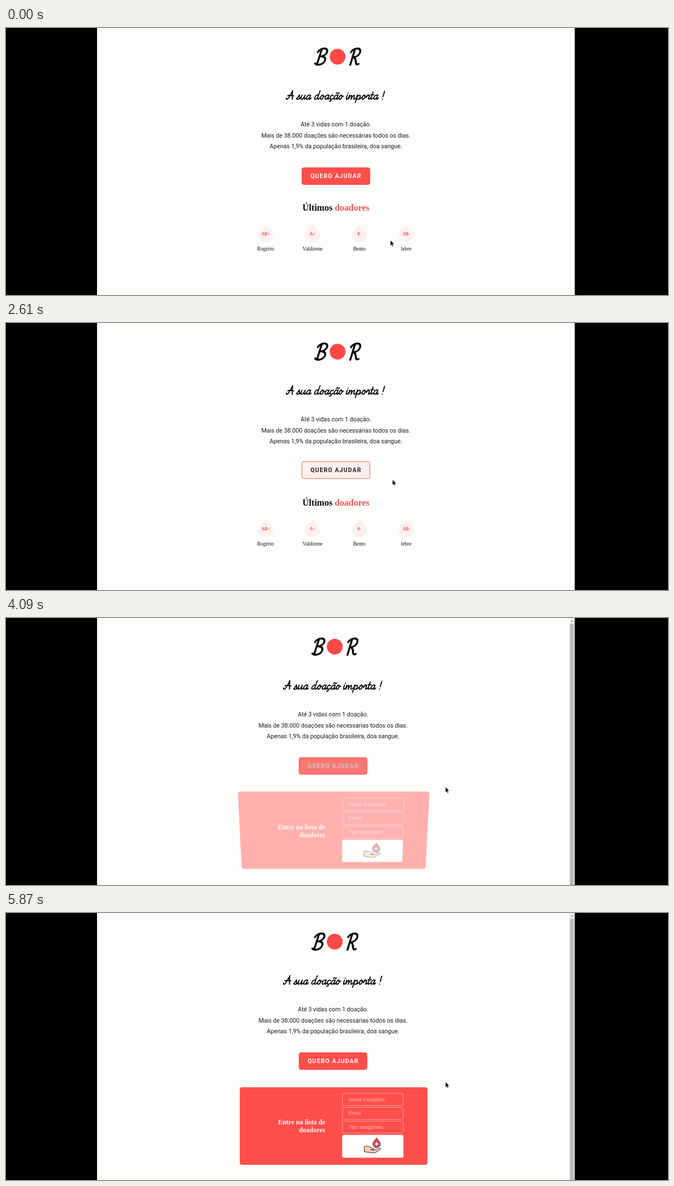
Recreate the animation shown at these times as an HTML page. Size 1178x475 px, loop 5.9 s.

```html
<!DOCTYPE html>
<html lang="pt-BR">
<head>
<meta charset="utf-8">
<title>Doação</title>
<style>
html, body { margin: 0; width: 100%; height: 100%; overflow: hidden; background: #000; }
.stage { position: relative; width: 1178px; height: 475px; overflow: hidden; }
.stage > svg { position: absolute; left: 0; top: 0; }
.serif { font-family: "Liberation Serif", "Times New Roman", serif; }
.bold { font-weight: 700; }
.mid { text-anchor: middle; }
.script { fill: none; stroke: #0a0a0a; stroke-linecap: round; stroke-linejoin: round; }
.copy { font: 10.67px Roboto, sans-serif; fill: #1c1c1c; }
.title { font-size: 16px; fill: #0a0a0a; }
.types { font-size: 8px; fill: #e5505c; }
.people { font-size: 9.33px; fill: #111; }

.page, .before, .after, .button, .form, .pointer, .arrow, .hand { animation: 5900ms linear infinite; }
.page { animation-name: shift; }
.before { animation-name: leave; }
.after { animation-name: enter; }

.button {
  position: absolute; left: 526.3px; top: 248.2px; width: 121.7px; height: 31.3px;
  box-sizing: border-box; border: 1px solid; border-radius: 4px;
  font: 700 10.67px/29.3px Roboto, sans-serif; letter-spacing: 1.07px;
  text-align: center; white-space: nowrap;
  animation-name: hover, shift; animation-timing-function: ease, linear;
}

.form {
  position: absolute; left: 415.5px; top: 310.3px; width: 334px; height: 138px;
  border-radius: 4px; background: #ff4f4b;
  animation-name: flip, fade;
}
.form svg { display: block; }
.form .heading { font-size: 12px; fill: #fff3f1; text-anchor: end; }
.field rect { fill: none; stroke: #ff9d99; }
.field text { font: 8.89px "Liberation Sans", Arial, sans-serif; fill: #ffb9b5; }

.pointer { animation-name: travel; }
.arrow { animation-name: arrow; }
.hand { animation-name: hand; }

@keyframes shift {
  0%, 63.13% { translate: 0; }
  63.14%, 100% { translate: -5px; }
}
@keyframes leave {
  0%, 63.13% { opacity: 1; }
  63.14%, 100% { opacity: 0; }
}
@keyframes enter {
  0%, 63.13% { opacity: 0; }
  63.14%, 100% { opacity: 1; }
}
@keyframes hover {
  0%, 27.1%, 48.9%, 54.2%, 72%, 100% {
    background-color: #ff4f4b; border-color: #ff4f4b; color: #fff6f4; transform: none;
  }
  32.2%, 43.8%, 59.3%, 66.95% {
    background-color: #fdfdfb; border-color: #df7258; color: #111; transform: translateY(-2px);
  }
}
@keyframes flip {
  0%, 63.14% { transform: perspective(267px) rotateX(90deg); animation-timing-function: ease-in; }
  69.92% { transform: perspective(267px) rotateX(-20deg); animation-timing-function: ease-in; }
  73.31% { transform: perspective(267px) rotateX(10deg); animation-timing-function: ease; }
  76.69% { transform: perspective(267px) rotateX(-5deg); animation-timing-function: ease; }
  80.08%, 100% { transform: perspective(267px) rotateX(0deg); }
}
@keyframes fade {
  0%, 63.14% { opacity: 0; animation-timing-function: ease-in; }
  73.31%, 100% { opacity: 1; }
}
@keyframes travel {
  0%, 11% { transform: translate(684px, 377.5px); animation-timing-function: ease-in-out; }
  18.47% { transform: translate(680px, 361.5px); }
  27.1% { transform: translate(640px, 278px); animation-timing-function: ease-out; }
  31% { transform: translate(612px, 264px); }
  40% { transform: translate(616px, 266px); animation-timing-function: ease-in; }
  43.7% { transform: translate(648px, 272px); }
  44.24% { transform: translate(687.5px, 278.5px); animation-timing-function: ease-out; }
  47% { transform: translate(706px, 284px); animation-timing-function: ease-in; }
  54.2% { transform: translate(648px, 277px); animation-timing-function: ease-out; }
  58%, 65% { transform: translate(626px, 267px); animation-timing-function: ease-in; }
  66.9% { transform: translate(648px, 275px); animation-timing-function: ease-out; }
  69.3%, 100% { transform: translate(782px, 300.5px); }
}
@keyframes arrow {
  0%, 27.1%, 43.71%, 54.2%, 66.91%, 100% { opacity: 1; }
  27.11%, 43.7%, 54.21%, 66.9% { opacity: 0; }
}
@keyframes hand {
  0%, 27.1%, 43.71%, 54.2%, 66.91%, 100% { opacity: 0; }
  27.11%, 43.7%, 54.21%, 66.9% { opacity: 1; }
}
</style>
</head>
<body>
<div class="stage">
  <svg width="1178" height="475">
    <rect x="162" width="850" height="475" fill="#fdfdfb"/>
    <g class="page">
      <g role="img" aria-label="BOR">
        <g class="script" stroke-width="3.5">
          <path transform="translate(549 66) skewX(-12)" d="M7-28L4-1M1-23Q4-30 12-29.5C21-28.5 18-16.5 8.5-15.5C21-16 19-1 7-.5Q2.5-.5 .5-3"/>
          <path transform="translate(608 66) skewX(-12)" d="M7-28L4.5-.5M1-23Q4-30 12-29.5C21-28 18-15 7.5-14Q12-12 13.5-5Q15 .5 19-2"/>
        </g>
        <circle cx="590" cy="51" r="14" fill="#fb4a45"/>
      </g>
      <g id="slogan" class="script" stroke-width="1.9" role="img" aria-label="A sua doação importa !"></g>
      <g class="copy mid">
        <text x="587" y="175.4">Até 3 vidas com 1 doação.</text>
        <text x="587" y="194.9">Mais de 38.000 doações são necessárias todos os dias.</text>
        <text x="587" y="214.3">Apenas 1,9% da população brasileira, doa sangue.</text>
      </g>
    </g>
    <g class="before serif mid">
      <text class="title bold" x="587.2" y="325">Últimos <tspan fill="#ea5757">doadores</tspan></text>
      <g id="drops" fill="#fbf1ef"></g>
      <g id="types" class="types bold"></g>
      <g id="people" class="people"></g>
    </g>
    <g class="after">
      <rect x="1002.5" width="9.5" height="475" fill="#f0f0ee"/>
      <rect x="1003.5" y="10.5" width="7" height="465" fill="#b9b9b9"/>
      <path d="M1005 6.5L1007 4L1009 6.5Z" fill="#777"/>
    </g>
  </svg>

  <div class="button">QUERO AJUDAR</div>

  <div class="form">
    <svg width="334" height="138" viewBox="415.5 310.3 334 138">
      <g class="heading serif bold">
        <text x="567.5" y="376.6">Entre na lista de</text>
        <text x="567.5" y="390.6">doadores</text>
      </g>
      <g id="fields"></g>
      <rect x="597.7" y="395" width="109" height="40.5" rx="3" fill="#fffefd"/>
      <g stroke="#3a1c2c" stroke-linejoin="round">
        <path fill="#d8475f" d="M659 400.5C661 404 665.5 407 665.5 411.5A6.5 6 0 0 1 652.5 411.5C652.5 407 657 404 659 400.5Z"/>
        <path stroke="#fff" stroke-width="1.8" d="M659 408v6.4M655.8 411.2h6.4"/>
        <path fill="#f2cdb2" d="M637 416Q642 413.5 647 416.5L652 418.5Q655 419 654.5 421L648 421.5 655 422.5 664 418.5Q667.5 418.5 666 420.5L657 426.5Q654 428 650 427L637 425Z"/>
      </g>
    </svg>
  </div>

  <svg width="1178" height="475">
    <g class="pointer">
      <path class="arrow" d="M0 0V10L2.3 7.9L3.9 11.4L5.4 10.7L3.9 7.3H7Z" stroke="#fff" stroke-width=".6"/>
      <path class="hand" d="M-1 1Q0-.4 1 1V5Q5 4.6 5.4 6.5V9Q5 11 4.4 12.5H-1.6Q-3.5 9.5-4.6 7.6Q-4.3 6.2-2.6 7.4L-1 8.6Z" fill="#fff" stroke="#222" stroke-width=".9"/>
    </g>
  </svg>
</div>

<script>
const add = (id, name, attrs, text = '') => {
  const el = document.createElementNS('http://www.w3.org/2000/svg', name);
  for (const key in attrs) el.setAttribute(key, attrs[key]);
  el.textContent = text;
  document.getElementById(id).append(el);
  return el;
};

// Script letters: advance, then strokes on a baseline at zero
const bowl = 'M6.5-7.2C4-9 .8-6.5 1-3C1.2.8 4.5.5 6.3-3.5';
const a = bowl + 'L7-7.5Q5.5-.5 7-.3Q8.2-.2 9.2-2.5';
const letters = {
  A: [15, 'M.3-2.5Q1 .8 3-.5Q6-5 8.2-15.5Q9.5-6 11.5-.3M1.8-6.5Q6-8 12.5-6.2'],
  s: [7.3, 'M0-1.5Q2.5-3.5 3.5-8Q3.8-5.5 5-3.5C6-.8 3 .6 1-.8M4.6-.6Q6-.8 7.2-3'],
  u: [9.3, 'M1-7.5Q-.5-.3 2.3-.3Q5-.5 6.7-7.5Q5.6-.5 7-.3Q8.3-.2 9.3-2.5'],
  a: [8.7, a],
  d: [10, bowl + 'L7.6-15.5Q6-.5 7.2-.3Q8.6-.2 10-2.5'],
  o: [8.5, 'M4.5-7.5C1-7.8 0-.2 3.2-.2C6.6-.2 7-7.3 4-7.5Q5-4.8 8.5-5.5'],
  'ç': [7.4, 'M6-6.2Q5.5-8 3.8-7.5C.5-6.5 .5-.3 3.3-.2Q5.5-.3 7.5-2.5M3.2 0Q5 1.5 3.4 3Q2.5 3.6 1.5 3.2'],
  'ã': [8.7, a + 'M3-10.8Q4.5-12.5 5.8-11.2T8.4-11.6'],
  i: [4.5, 'M1.5-7.5Q.5-.3 2-.3Q3.2-.3 4.5-2.5M2-11v.2'],
  m: [13.7, 'M1-7.5L.8-.2Q2.5-7 4.3-7.4Q5.6-7.5 5.2-.2Q7-7 8.8-7.4Q10.4-7.4 9.8-2.5Q9.6-.2 11-.3Q12.2-.5 13.5-2.5'],
  p: [9.5, 'M1.3-8L.8 5.5M1-1.5C2-8 6.8-9 7-4.5C7 0 3.5 .8 1.8-1.5M5-.3Q7.5-.3 9.5-3'],
  r: [7, 'M0-3Q1.5-6 2-8.5Q2.5-7 5-7Q4-.4 5.3-.3Q6.3-.3 7.3-2.5'],
  t: [5.7, 'M2.8-13Q1-.3 2.6-.3Q4-.3 5.5-2.5M.2-8.3H5.5'],
  '!': [4, 'M2-14.5L1.8-5M1.7-.5v.2']
};

const write = (word, x) => {
  for (const c of word) {
    const [advance, d] = letters[c];
    add('slogan', 'path', { d, transform: `translate(${x} 127) skewX(-14)` });
    x += advance;
  }
};
write('A', 498);
write('sua', 516.5);
write('doação', 547.5);
write('importa', 604);
write('!', 668);

const drop = 'M0-17C3-11 13.5-7 13.5 1A13.5 13.5 0 0 1-13.5 1C-13.5-7-3-11 0-17Z';
[['AB+', 'Rogério'], ['A+', 'Valdirene'], ['0-', 'Bento'], ['AB-', 'lebre']].forEach(([type, person], i) => {
  const x = 462 + i * 83.4;
  add('drops', 'path', { d: drop, transform: `translate(${x} 366.5)` });
  add('types', 'text', { x, y: 369.2 }, type);
  add('people', 'text', { x, y: 395.8 }, person);
});

['Nome Completo', 'Email', 'Tipo sanguíneo'].forEach((label, i) => {
  const y = 321.3 + i * 24.7;
  const id = 'field' + i;
  add('fields', 'g', { id, class: 'field' });
  add(id, 'rect', { x: 598.2, y, width: 108, height: 21.6, rx: 3 });
  add(id, 'text', { x: 609, y: y + 13.8 }, label);
});
</script>
</body>
</html>
```
